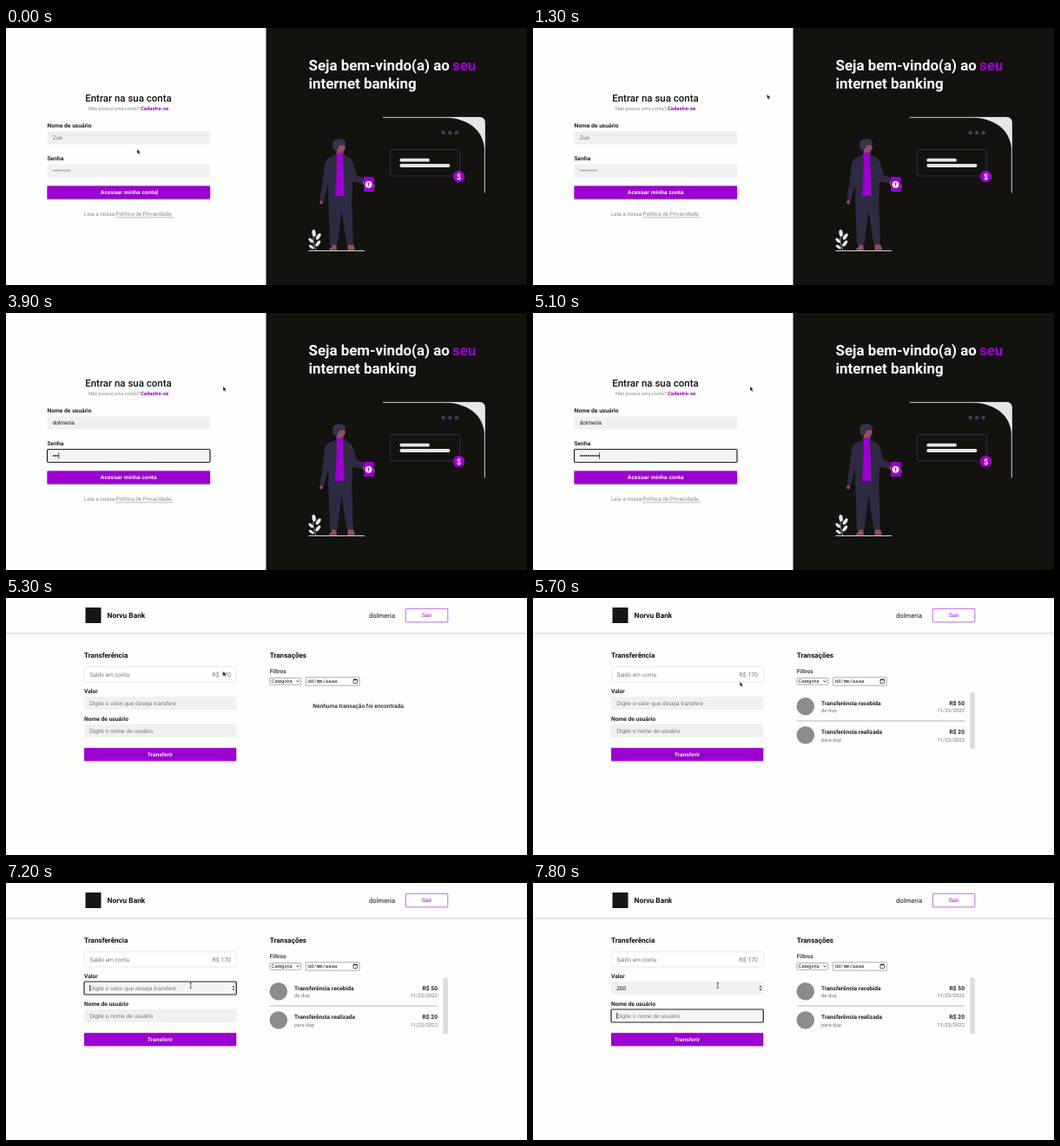
Animation of 600 by 297 pixels, one loop 8000 ms. Source, as an HTML page:

```html
<!DOCTYPE html>
<html lang="pt-BR">
<head>
<meta charset="utf-8">
<title>Internet banking</title>
<style>
  html, body { margin: 0; width: 100%; height: 100%; overflow: hidden; background: #fdfdfb; }
  svg { display: block; width: 100%; height: 100%; }
  text { font: 6.57px Roboto, sans-serif; fill: #777; text-rendering: geometricPrecision; white-space: pre; }
  .label { font-size: 6.7px; font-weight: 700; fill: #222; }
  .title { font-size: 8.1px; font-weight: 700; fill: #111; }
  .hero { font-size: 16.9px; font-weight: 700; fill: #fdfdfd; }
  .small { font-size: 5.95px; }
  .control { font-family: "Liberation Sans", Arial, sans-serif; fill: #757575; }
  .typed { fill: #111; }
  .on-button { font-size: 6.45px; font-weight: 700; fill: #fff; }
  .middle { text-anchor: middle; }
  .end { text-anchor: end; }
  .purple { fill: #9b00d0; }
  .field { fill: #f0f0ef; stroke: none; }
  .focused { fill: #f4f4f3; stroke: #222; stroke-width: 1.2; }
  .light { fill: #e6e6e6; }
  .navy { fill: #2f2a43; }
  .skin { fill: #8f5059; }
  .widget { fill: #fff; stroke: #777; stroke-width: .6; }
</style>
</head>
<body>
<svg viewBox="0 0 600 297" preserveAspectRatio="none">
  <g id="login">
    <rect width="300" height="297" fill="#fefefd"/>
    <rect x="299.5" width="300.5" height="297" fill="#13120f"/>

    <text x="141" y="84.5" class="middle" style="font-size:11.5px;font-weight:500;fill:#111">Entrar na sua conta</text>
    <text x="95" y="95" style="font-size:5.58px;fill:#888">Não possui uma conta?</text>
    <text x="155" y="95" class="purple" style="font-size:5.85px;font-weight:700">Cadastre-se</text>

    <text x="47.5" y="115.3" class="label">Nome de usuário</text>
    <rect id="userBox" x="47.5" y="119.5" width="187.5" height="15" rx="1.2"/>
    <text id="userText" x="53.7" y="129.2"></text>
    <text x="47.5" y="153.3" class="label">Senha</text>
    <rect id="passBox" x="47.5" y="157.5" width="187.5" height="15" rx="1.2"/>
    <text id="passHint" x="53.7" y="168" class="control">********</text>
    <g id="dots" fill="#111"></g>

    <rect x="47.2" y="182.6" width="188.2" height="15.9" rx="1" fill="#aaa"/>
    <rect x="47.5" y="182.5" width="187.5" height="15" rx="1" class="purple"/>
    <text x="141.2" y="192.3" class="control on-button middle">Acessar minha conta</text>
    <text x="89.8" y="217" style="font-size:6.35px;fill:#888">Leia a nossa</text>
    <text x="126.5" y="217" style="font-size:6.35px;fill:#888">Política de Privacidade.</text>
    <path d="M126.5 218.9H193" stroke="#999" stroke-width=".7"/>

    <text x="348.5" y="49" class="hero">Seja bem-vindo(a) ao</text>
    <text x="514" y="49" class="hero purple">seu</text>
    <text x="348.5" y="70" class="hero">internet banking</text>

    <!-- browser corner and payment card -->
    <path d="M434 103.3H545Q551.3 103.3 551.3 109.5V190.5" fill="none" stroke="#e6e6e6" stroke-width=".9"/>
    <path d="M504 103H545Q551.5 103 551.5 109.5V142C550 119 535 105 504 103Z" class="light"/>
    <g fill="#3f3d56"><circle cx="503.6" cy="121" r="2.3"/><circle cx="511.2" cy="121" r="2.3"/><circle cx="518.8" cy="121" r="2.3"/></g>
    <rect x="442.5" y="140.5" width="80" height="30.5" rx="2" fill="none" stroke="#3f3d4a" stroke-width=".7"/>
    <path d="M455.3 152.7H486M455.3 159H509.5" stroke="#e6e6e6" stroke-width="3.8" stroke-linecap="round"/>
    <circle cx="521.5" cy="171.4" r="6.7" class="purple"/>
    <text x="521.5" y="174.7" class="middle" style="font-size:9px;font-weight:500;fill:#fff">$</text>

    <!-- plant -->
    <path d="M348.5 257.5H413" stroke="#e6e6e6" stroke-width=".9"/>
    <g class="light">
      <path d="M357 257Q352 246 355 236" fill="none" stroke="#e6e6e6" stroke-width=".6"/>
      <ellipse cx="354.6" cy="237" rx="2.2" ry="4" transform="rotate(-8 354.6 237)"/>
      <ellipse cx="359.7" cy="241" rx="2" ry="4.2" transform="rotate(35 359.7 241)"/>
      <ellipse cx="351.2" cy="245.5" rx="1.8" ry="3.4" transform="rotate(-45 351.2 245.5)"/>
      <ellipse cx="359.3" cy="249" rx="1.9" ry="4" transform="rotate(38 359.3 249)"/>
      <ellipse cx="351.8" cy="253" rx="1.6" ry="3.4" transform="rotate(-55 351.8 253)"/>
    </g>

    <!-- man with phone -->
    <path d="M374.5 248H380L381 256.7H372Q372 254 375 253ZM393.5 248H399L402 255Q402 256.7 400 256.7H393.5Z" class="skin"/>
    <path d="M371 192H398L400 250.5H392.5L386.5 211L381.5 250.5H373Z" class="navy"/>
    <path d="M381 140H388.5V149H380Z" class="skin"/>
    <path d="M380 144.5L388.5 143.5L390.5 194H378Z" class="purple"/>
    <path d="M381 146L371 150.5Q366.5 153 366.3 164L361.5 199L365.5 201L371 181L371.5 196L379 195L380.5 170Z" class="navy"/>
    <path d="M388 146L395 149.5Q399.5 152 401 160L404 170L413 173.5L412 180.5L399 177.5L398.5 196H390L389 170Z" class="navy"/>
    <ellipse cx="363" cy="201.5" rx="1.8" ry="2.3" class="skin"/>
    <ellipse cx="385.5" cy="137.5" rx="5.2" ry="6" class="skin"/>
    <path d="M377 140Q374 129.5 382 128.5Q391 127.5 391.3 133.5L389.5 135.5Q383 134.5 382.5 139L379.5 142Z" fill="#37334a"/>
    <path d="M411 177L415 176V183L411 181ZM423 180L424.8 181V184.5L423 185Z" class="skin"/>
    <rect x="412.2" y="172" width="11.4" height="17" rx=".8" class="purple"/>
    <circle cx="417.6" cy="180.8" r="3.9" fill="#f3f3f3"/>
    <path d="M417.6 178.5V183.1M416.5 179.8H418.7" stroke="#9b00d0" stroke-width=".9"/>
  </g>

  <g id="account">
    <rect width="600" height="297" fill="#fdfdfb"/>
    <rect y="40" width="600" height="1.6" fill="#dedede"/>
    <rect y="41.6" width="600" height="1" fill="#f3f3f2"/>
    <rect width="600" height="40" fill="#fefefd"/>
    <rect x="91.5" y="11" width="18" height="18" fill="#161616"/>
    <text x="116.5" y="23" class="title" style="font-size:8.4px">Norvu Bank</text>
    <text x="418" y="22.6" style="font-size:7.65px;font-weight:500;fill:#444">dolmeria</text>
    <rect x="460.3" y="12.3" width="48.5" height="15.6" rx=".8" fill="#fff" stroke="#b23fe0" stroke-width=".8"/>
    <text x="484.5" y="22.3" class="control purple middle">Sair</text>

    <text x="90" y="69.2" class="title">Transferência</text>
    <rect x="90.4" y="79.6" width="175" height="17.4" rx="1" fill="#fefefe" stroke="#e2e2e2" stroke-width=".8"/>
    <text x="96.5" y="90.9">Saldo em conta</text>
    <text x="259" y="90.9" class="end" style="font-size:6.9px">R$ 170</text>
    <text x="90" y="110" class="label">Valor</text>
    <rect id="valueBox" x="90" y="114" width="175.3" height="15" rx="1.2"/>
    <text id="valueText" x="96.2" y="123.7"></text>
    <path id="spinner" d="M260.4 120.6L262 118.6L263.6 120.6ZM260.4 122.6L262 124.6L263.6 122.6Z" fill="#444"/>
    <text x="90" y="142.2" class="label">Nome de usuário</text>
    <rect id="payeeBox" x="90" y="146" width="175.3" height="15" rx="1.2"/>
    <text x="96.2" y="155.6" class="control">Digite o nome de usuário</text>
    <rect x="90" y="173.2" width="175.3" height="15.2" rx="1" class="purple"/>
    <text x="177.6" y="183" class="control on-button middle" style="font-size:6.3px">Transferir</text>

    <text x="303.7" y="69.2" class="title">Transações</text>
    <text x="303.7" y="86.6" class="label" style="fill:#444">Filtros</text>
    <rect x="303.9" y="92.4" width="35.8" height="7.8" rx="1" class="widget"/>
    <text x="305.6" y="98.2" class="control typed" style="font-size:5.55px">Categoria</text>
    <path d="M334.3 95.4L336 97.1L337.7 95.4" fill="none" stroke="#222" stroke-width=".8"/>
    <rect x="345.4" y="91.7" width="61.8" height="9.4" rx=".5" class="widget"/>
    <text x="347.4" y="98.2" class="typed" style="font:5.7px 'Liberation Mono',monospace">dd/mm/aaaa</text>
    <rect x="400" y="94.3" width="4.4" height="4.2" fill="none" stroke="#222" stroke-width=".7"/>
    <path d="M400 94.6H404.4M401.1 93.3V94M403.3 93.3V94" stroke="#222" stroke-width="1"/>

    <text id="empty" x="406.5" y="127.2" class="middle" style="font-size:6.65px;font-weight:500;fill:#222">Nenhuma transação foi encontrada.</text>
    <g id="list">
      <rect x="503.3" y="109.3" width="5.6" height="65.2" rx="1.8" fill="#dcdcdc"/>
      <path d="M303.7 142H497" stroke="#cfcfcf" stroke-width="1.5"/>
    </g>
  </g>

  <path id="caret" stroke="#111" stroke-width=".7"/>
  <path id="arrow" d="M0 0V5.4L1.3 4.2L2.2 6.2L3.2 5.7L2.3 3.9H4Z" fill="#111" stroke="#fff" stroke-width=".35"/>
  <path id="beam" d="M-1.2-3H1.2M0-3V3M-1.2 3H1.2" stroke="#333" stroke-width=".7"/>
</svg>

<script>
const LOOP = 8000, STEP = 100, ACCOUNT_OPENS = 5300, DOT_WIDTH = 2.25;
const USER = 'dolmeria', AMOUNT = '200';
const el = id => document.getElementById(id);
const show = (id, on) => el(id).setAttribute('visibility', on ? 'inherit' : 'hidden');

// [time, x, y]
const POINTER = [
  [0, 151, 140], [200, 143, 141], [400, 155, 138], [900, 155, 138], [1300, 269.5, 76.5],
  [1800, 269.5, 76.5], [2200, 182, 126], [2300, 182, 126], [2600, 250, 84.8], [5400, 250, 84.8],
  [5800, 236, 99], [6500, 169.8, 137], [6900, 212.7, 118.3], [8000, 212.7, 118.3]
];
// [time, value]
const FOCUS = [[0, 'button'], [2300, 'user'], [3200, 'pass'], [5300, ''], [6900, 'value'], [7800, 'payee']];
const USER_LENGTH = [[0, 0], [2900, 3], [3000, 6], [3100, 8]];
const PASS_LENGTH = [[0, 0], [3900, 3], [4100, 5], [4400, 3], [4500, 1], [4600, 3], [4800, 5], [4900, 8], [5100, 10]];
const AMOUNT_LENGTH = [[0, 0], [7400, 1], [7500, 2], [7600, 3]];

const latest = (track, t) => track.findLast(([time]) => time <= t);

function pointerAt(t) {
  const i = POINTER.findIndex(([time]) => time > t);
  const [t0, x0, y0] = POINTER[i - 1], [t1, x1, y1] = POINTER[i];
  const p = (t - t0) / (t1 - t0), eased = p * p * (3 - 2 * p);
  return [x0 + (x1 - x0) * eased, y0 + (y1 - y0) * eased];
}

function fill(id, typed, hint) {
  el(id).textContent = typed || hint;
  el(id).setAttribute('class', typed ? 'control typed' : 'control');
}

function addTransaction(y, kind, party, amount) {
  el('list').insertAdjacentHTML('beforeend', `
    <circle cx="313.8" cy="${y}" r="10.3" fill="#8c8c8c"/>
    <text x="332" y="${y - 1.4}" class="label" style="font-size:6.64px">Transferência ${kind}</text>
    <text x="332" y="${y + 7.2}" class="small">${party}</text>
    <text x="497" y="${y - 1.4}" class="label end">R$ ${amount}</text>
    <text x="497" y="${y + 7.2}" class="small end">11/23/2022</text>`);
}
addTransaction(125.2, 'recebida', 'de dup', 50);
addTransaction(158.5, 'realizada', 'para dup', 20);

for (let i = 0; i < 10; i++) {
  el('dots').insertAdjacentHTML('beforeend', `<circle cx="${54.9 + i * DOT_WIDTH}" cy="164.9" r=".9"/>`);
}

function drawCaret(t, focus, focusTime, lengths) {
  const caretX = {
    button: () => 174.3,
    user: () => 54 + (lengths.user ? el('userText').getComputedTextLength() : 0),
    pass: () => 54 + lengths.pass * DOT_WIDTH,
    value: () => 96.6 + (lengths.amount ? el('valueText').getComputedTextLength() : 0),
    payee: () => 96.6
  };
  const caretY = { button: 190, user: 127, pass: 165, value: 121.5, payee: 153.5 };
  const track = { user: USER_LENGTH, pass: PASS_LENGTH, value: AMOUNT_LENGTH }[focus];
  const since = focus === 'button' ? -300 : Math.max(focusTime, track ? latest(track, t)[0] : 0);
  const on = focus && (t - since) % 1000 < 500;
  show('caret', on);
  if (!on) return;
  el('caret').setAttribute('d', `M${caretX[focus]()} ${caretY[focus] - 3.6}v7.2`);
  el('caret').setAttribute('stroke', focus === 'button' ? '#fff' : '#111');
}

function draw(t) {
  const inAccount = t >= ACCOUNT_OPENS;
  show('login', !inAccount);
  show('account', inAccount);
  show('empty', inAccount && t < 5400);
  show('list', inAccount && t >= 5400);
  show('spinner', t >= 6400);

  const [focusTime, focus] = latest(FOCUS, t);
  for (const name of ['user', 'pass', 'value', 'payee']) {
    el(name + 'Box').setAttribute('class', name === focus ? 'focused' : 'field');
  }

  const lengths = {
    user: latest(USER_LENGTH, t)[1],
    pass: latest(PASS_LENGTH, t)[1],
    amount: latest(AMOUNT_LENGTH, t)[1]
  };
  fill('userText', USER.slice(0, lengths.user), 'Zue');
  fill('valueText', AMOUNT.slice(0, lengths.amount), 'Digite o valor que deseja transferir');
  show('passHint', !inAccount && !lengths.pass);
  [...el('dots').children].forEach((dot, i) =>
    dot.setAttribute('visibility', !inAccount && i < lengths.pass ? 'visible' : 'hidden'));
  drawCaret(t, focus, focusTime, lengths);

  const [x, y] = pointerAt(t);
  const overField = inAccount ? x < 265 && y > 114 && y < 129 : x < 235 && y > 119.5 && y < 134.5;
  show('arrow', !overField);
  show('beam', overField);
  for (const id of ['arrow', 'beam']) el(id).setAttribute('transform', `translate(${x} ${y})`);
}

const start = performance.now();
function tick() {
  const t = (performance.now() - start) % LOOP;
  draw(Math.floor(t / STEP) * STEP);
  requestAnimationFrame(tick);
}
tick();
</script>
</body>
</html>
```
